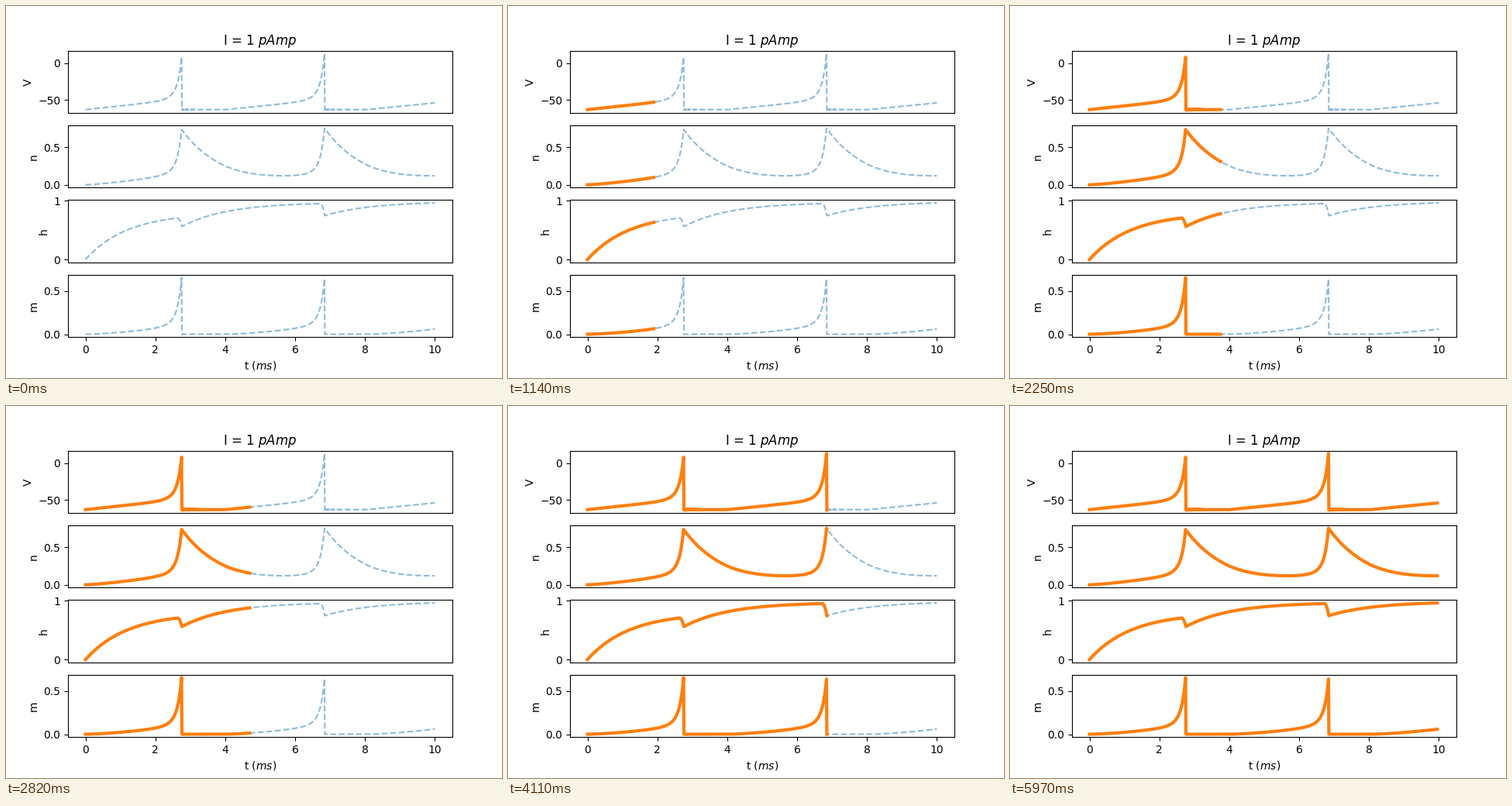
A matplotlib script that plays this animation: 640 by 480 pixels, repeating every 6000 ms.

```python
import numpy as np
import matplotlib.pyplot as plt
from matplotlib.animation import FuncAnimation

FRAMES = 200
STEP = 5                    # samples revealed per frame
t = np.linspace(0, 10, FRAMES * STEP + 1)

ONSETS = (0, 4, 8.05)       # start of each slow climb
PEAKS = (2.75, 6.84)
RESETS = (2.755, 6.845)
phase = np.searchsorted(RESETS, t)


def spike(x, peak):
    """Steep upstroke that reaches 1 at the peak."""
    return (1 + np.maximum(peak - x, 0) / 0.6) ** -5


def climb(rest, gains, power, tops, tau=None):
    """Slow climb, spike and reset; with tau the peak decays instead."""
    y = np.empty_like(t)
    for k, onset in enumerate(ONSETS):
        def base(x):
            slow = rest + gains[k > 0] * np.maximum(x - onset, 0) ** power
            if tau and k:
                slow = slow + tops[k - 1] * np.exp((PEAKS[k - 1] - x) / tau)
            return slow

        x = t[phase == k]
        y[phase == k] = base(x)
        if k < len(PEAKS):
            peak = PEAKS[k]
            y[phase == k] += (tops[k] - base(peak)) * spike(x, peak)
    return y


def ripple(size, span):
    """Alternating ripple that fades after each reset."""
    y = np.zeros_like(t)
    for start in np.searchsorted(t, RESETS):
        k = np.arange(len(t) - start)
        y[start:] += size * (-1.0) ** k * np.exp(-k / span)
    return y


def recover(start, low, top, tau):
    return top - (top - low) * np.exp((start - t) / tau)


def inactivation():
    y = np.choose(phase, [recover(0, 0, 0.794, 1.196),
                          recover(2.76, 0.56, 0.97, 1.3),
                          recover(6.85, 0.745, 0.983, 1.3)])
    for k, depth in enumerate((0.155, 0.207)):
        ease = np.clip((t - PEAKS[k] + 0.12) / 0.13, 0, 1) ** 2
        y -= depth * ease * (phase == k)
    return y


curves = {
    "V": climb(-63, (5, 4.7), 1, (8, 13)) + ripple(-0.6, 25),
    "n": climb(0, (0.04, 0.03), 1.3, (0.735, 0.752), tau=1.157),
    "h": inactivation(),
    "m": climb(0, (0.022, 0.022), 1.5, (0.655, 0.64)),
}

fig, axes = plt.subplots(4, 1, figsize=(6.4, 4.8), dpi=100)
traces = []
for ax, (name, y) in zip(axes, curves.items()):
    ax.plot(t, y, "--", color="C0", alpha=0.5)
    traces.append(ax.plot([], [], color="C1", lw=3)[0])
    ax.set_xlim(-0.5, 10.5)
    ax.set_ylabel(name)
    if ax is not axes[-1]:
        ax.set_xticks([])
axes[0].set_title("I = 1 $pAmp$", pad=5.3)
axes[-1].set_xlabel("t $(ms)$")


def update(i):
    n = STEP * i + 1 if i else 0
    for line, y in zip(traces, curves.values()):
        line.set_data(t[:n], y[:n])
    return traces


anim = FuncAnimation(fig, update, frames=FRAMES, interval=30, repeat=True,
                     repeat_delay=0)
plt.show()
```
